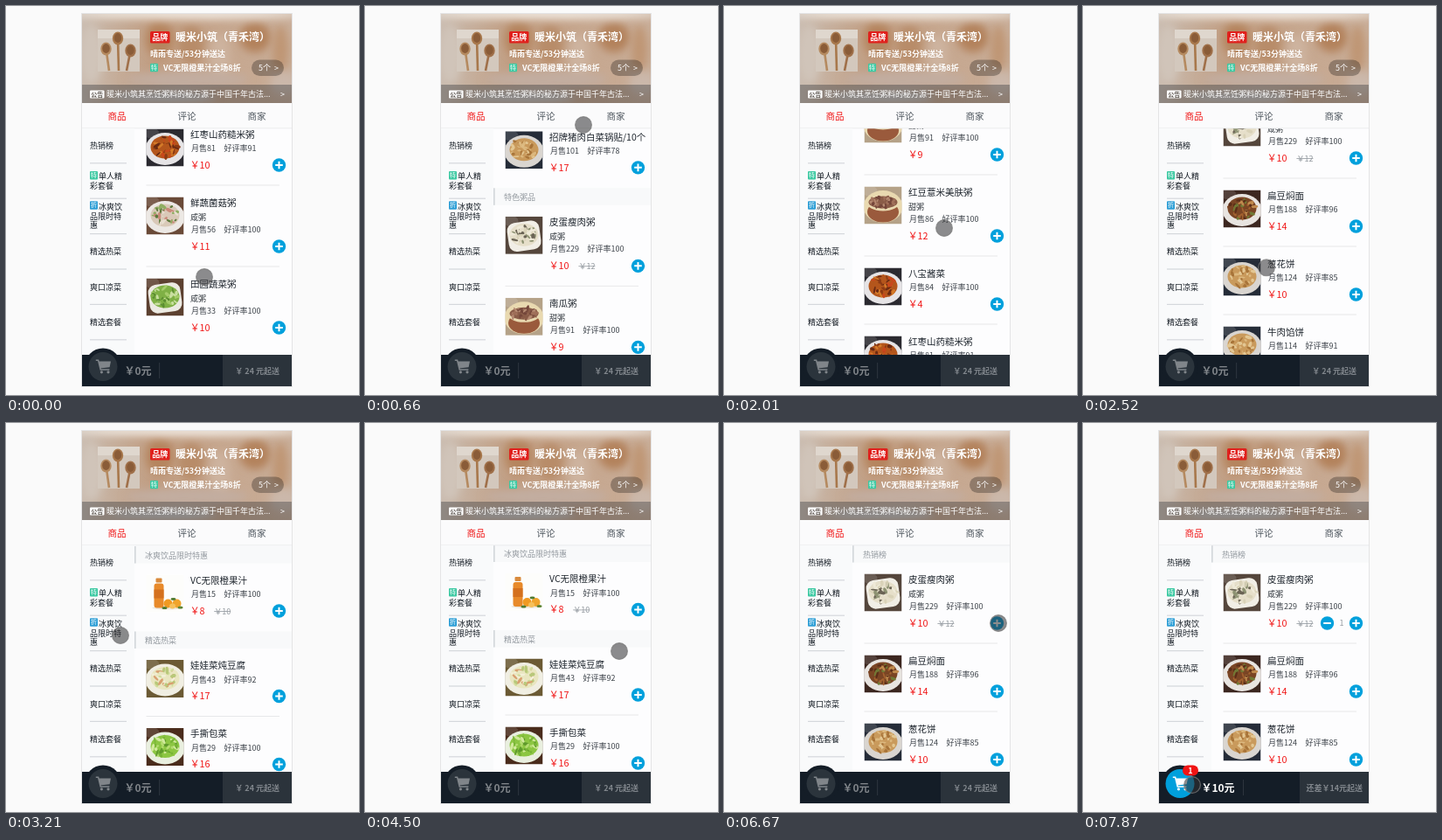
Recreate the animation shown at these times as an HTML page. Size 404 px wide and 445 px high, loop 7.99 s.

```html
<!DOCTYPE html>
<html lang="zh-CN">
<head>
<meta charset="utf-8">
<title>点餐</title>
<style>
html, body { margin: 0; width: 100%; height: 100%; overflow: hidden; background: #fafafa; }
svg { display: block; width: 404px; height: 445px; font-family: "Noto Sans CJK SC", "Noto Sans CJK", sans-serif; }
text { white-space: pre; }
</style>
</head>
<body>
<svg id="stage" viewBox="0 0 404 445"></svg>
<script>
const LOOP = 7990, STEPS = 60, TICK = LOOP / STEPS;
const BLUE = '#00a0dc', RED = '#f01414', BAR = '#141d27';

const rect = (x, y, w, h, fill, more = '') =>
  `<rect x="${x}" y="${y}" width="${w}" height="${h}" fill="${fill}" ${more}/>`;
const oval = (x, y, rx, ry, fill, more = '') =>
  `<ellipse cx="${x}" cy="${y}" rx="${rx}" ry="${ry}" fill="${fill}" ${more}/>`;
const path = (d, stroke, width, more = '') =>
  `<path d="${d}" fill="none" stroke="${stroke}" stroke-width="${width}" ${more}/>`;
// Text placed by the vertical centre of its line.
const label = (x, mid, size, fill, str, more = '') =>
  `<text x="${x}" y="${mid + size * 0.37}" font-size="${size}" fill="${fill}" ${more}>${str}</text>`;
const CENTER = 'text-anchor="middle" ', MEDIUM = 'font-weight="500"', BOLD = 'font-weight="700"';

function random(seed) {
  return () => (seed = (seed * 16807) % 2147483647) / 2147483647;
}

// Dish pictures: backdrop, plate, shape, food colours.
const DISHES = {
  egg: ['#55463c', '#f1eee6', 'square', '#e6dfca #d9d2b8 #efead9 #8d9272 #6b6455'],
  noodle: ['#3c2720', '#e8e4e0', 'round', '#7a4524 #a4622f #5b2e18 #c08a4d #6f7a35'],
  cake: ['#252c38', '#d9d5d0', 'round', '#c99a5c #dcb87e #a87439 #e3c793'],
  bean: ['#b5a288', '#e9d9b0', 'bowl', '#8a5c48 #a0705a #74463a #b58a72'],
  pickle: ['#2b2a30', '#e6e4e6', 'round', '#b4561c #8c3a14 #d47a28 #6a2a12 #c9471c'],
  mixed: ['#6a4a38', '#ece8e4', 'round', '#d9c9b8 #8fae62 #c98a7a #e8dfd0 #5e7a3c'],
  green: ['#5c4030', '#eceae2', 'square', '#7fb045 #a5cc6a #5b8d30 #c9dfa0'],
  tofu: ['#6b5a34', '#f0eee2', 'round', '#e9e6c0 #cfdc9a #f3f0d8 #b8c87a #d8a070'],
  cabbage: ['#4a2c1c', '#e9efdf', 'round', '#8cc642 #b4dc70 #5f9a2c #d2ea9c #78b436'],
};

function picture(kind, y, seed) {
  const at = (s) => `<svg x="160.5" y="${y}" width="43" height="43">${s}</svg>`;
  if (kind === 'juice') return at(
    rect(0, 0, 43, 43, '#fdfdfb') + oval(24, 38, 17, 2, '#ece8e0') +
    rect(11, 4, 7, 5, '#d98a3c', 'rx="1"') + rect(9, 10, 11, 28, '#e88a2a', 'rx="3"') +
    rect(9, 17, 11, 10, '#d4701e') + oval(25, 33, 5, 5, '#f09a22') +
    oval(35, 33, 5, 5, '#f0a42c') + oval(30, 36, 3.5, 3, '#f6c05a') +
    oval(21, 38, 3, 1.6, '#4f7a30') + oval(39, 37.5, 3, 1.6, '#5d8434') + oval(31, 28, 3, 1.4, '#4f7a30'));
  if (kind === 'cup') return at(
    rect(0, 0, 43, 43, '#d9d3ca') + rect(0, 31, 43, 12, '#c6bdb2') +
    `<path d="M13 12H31L28 40H17Z" fill="#e58d52"/><path d="M15 17H24L22 38H18Z" fill="#f0ae7a"/>` +
    oval(22, 12, 9, 4, '#f2c6a0') + oval(19, 9, 4, 4, '#d8412f') + oval(26, 10, 3.5, 3.5, '#e9694a') +
    path('M25 9L31 1', '#b84a38', 1));
  if (kind === 'set') return at(
    rect(0, 0, 43, 43, '#c9c9cb') + oval(15, 14, 14, 11, '#b58a4c') + oval(15, 13, 12, 9, '#ead9a8') +
    [8, 15, 22].map((x) => oval(x, 13, 3.6, 4.2, '#d9a93c')).join('') +
    oval(32, 23, 10, 7, '#eeeeee') + oval(32, 23, 7, 4.5, '#8c3038') +
    oval(20, 34, 13, 7, '#f4f4f2') + oval(20, 33, 9, 4.5, '#3f6a35') + oval(17, 32, 4, 2, '#6c9a4c'));

  const [bg, plate, shape, colors] = DISHES[kind];
  const list = colors.split(' '), rnd = random(seed * 977 + 31);
  let s = rect(0, 0, 43, 43, bg) + oval(6, 5, 9, 6, '#fff', 'opacity=".12"');
  if (shape === 'square') s += rect(3, 6, 37, 33, plate, 'rx="9" transform="rotate(-8 21 22)"');
  else s += oval(21.5, 23, 22.5, 18.5, plate);
  if (shape === 'bowl') s += oval(21.5, 29, 18, 12, '#9a5a3c') + oval(21.5, 18, 19, 10, plate);
  const cy = shape === 'bowl' ? 18 : 21, rx = 16.5, ry = shape === 'bowl' ? 7 : 13;
  s += oval(21.5, cy, rx, ry, list[0]);
  for (let i = 0; i < 40; i++) {
    const a = rnd() * 6.283, d = Math.sqrt(rnd());
    const x = (21.5 + Math.cos(a) * d * (rx - 1.5)).toFixed(1), v = (cy + Math.sin(a) * d * (ry - 1.5)).toFixed(1);
    s += oval(x, v, 1.5 + rnd() * 3, 0.8 + rnd() * 1.2,
      list[i % list.length], `transform="rotate(${(rnd() * 180) | 0} ${x} ${v})"`);
  }
  return at(s);
}

// Each line: name|description|sold|rating|price|old price|picture.  "#" opens a section.
const EGG = '皮蛋瘦肉粥|咸粥|229|100|10|12|egg';
const SNACKS = `扁豆焖面||188|96|14||noodle
葱花饼||124|85|10||cake
牛肉馅饼||114|91|14||cake
招牌猪肉白菜锅贴/10个||101|78|17||cake`;
const SWEET = `南瓜粥|甜粥|91|100|9||bean
红豆薏米美肤粥|甜粥|86|100|12||bean`;
const PICKLE = '八宝酱菜||84|100|4||pickle';
const SAVORY = `红枣山药糙米粥||81|91|10||pickle
鲜蔬菌菇粥|咸粥|56|100|11||mixed
田园蔬菜粥|咸粥|33|100|10||green`;
const ORANGE = 'VC无限橙果汁||15|100|8|10|juice';
const MENU = `#热销榜
${EGG}
${SNACKS}
${SWEET}
${PICKLE}
${SAVORY}
#单人精彩套餐
红枣山药粥套餐|红枣山药糙米粥,素材包,/爽口莴笋丝|17|100|29|36|set
#冰爽饮品限时特惠
${ORANGE}
#精选热菜
娃娃菜炖豆腐||43|92|17||tofu
手撕包菜||29|100|16||cabbage
香酥黄金鱼||15|100|11||noodle
#爽口凉菜
${PICKLE}
拍黄瓜||28|100|9||green
#精选套餐
红豆薏米粥套餐|红豆薏米粥,三鲜干蒸烧/卖,拍黄瓜|3|100|37||set
皮蛋瘦肉粥套餐||12|100|31||set
#果拼果汁
蜜瓜圣女萝莉杯||1||6||cup
酸梅汤||7|100|6||cup
${ORANGE}
#小吃主食
${SNACKS}
#特色粥品
${EGG}
${SWEET}
${SAVORY}`;

const plus = (y) => oval(312.5, y, 7.7, 7.7, BLUE) +
  path(`M308.2 ${y}H316.8M312.5 ${y - 4.3}V${y + 4.3}`, '#fff', 2);

function goods() {
  const GAP = 13.5, HEAD = 19.5;
  let y = 0, first = true, out = '';
  MENU.split('\n').forEach((line, i) => {
    if (line[0] === '#') {
      out += rect(147, y, 180, HEAD, '#f8f9fa') + rect(147, y, 1.6, HEAD, '#d2d6da') +
        label(159, y + 10.6, 9, '#93999f', line.slice(1));
      y += HEAD;
      first = true;
      return;
    }
    const [name, desc, sold, rate, price, old, kind] = line.split('|');
    const rows = desc ? desc.split('/') : [];
    const extra = rows.length ? 6 + 9 * rows.length : 0;
    if (!first) out += rect(160.5, y - 1, 152.5, 1, '#e7e8ea');
    first = false;
    const top = y + GAP - 0.5, cost = top + 41.5 + extra;
    out += picture(kind, top, i + 1) + label(211, top + 6.4, 10.5, '#1d242c', name);
    rows.forEach((r, n) => { out += label(211, top + 22.7 + 9 * n, 9, '#2f353b', r); });
    out += label(212, top + 22.2 + extra, 9, '#3d434a', '月售' + sold) +
      label(239.5 + 5 * sold.length, top + 22.2 + extra, 9, '#3d434a', '好评率' + rate) +
      label(210.7, cost, 10.8, RED, '￥' + price);
    if (old) {
      const x = 232 + 6.2 * price.length;
      out += label(x, cost + 0.5, 9, '#93999f', '￥' + old) + rect(x, cost, 19, 0.8, '#93999f');
    }
    out += plus(cost);
    y += GAP + 51 + extra + GAP;
  });
  return out;
}

const tag = (x, y, color, ch) => rect(x, y, 9, 9.5, color, 'rx="1"') +
  label(x + 4.5, y + 4.7, 7, '#fff', ch, CENTER);

function sidebar() {
  let s = rect(87, 140, 60, 259, '#f9fafb');
  for (let i = 0; i < 6; i++) s += rect(96, 179.2 + 40.4 * i, 42, 1.2, '#d5d8dc');
  const rows = [[96, 159.8, '热销榜'], [106, 195, '单人精'], [96, 205.5, '彩套餐'], [106, 229.7, '冰爽饮'],
    [96, 240.5, '品限时特'], [96, 251, '惠'], [96, 281, '精选热菜'], [96, 321.5, '爽口凉菜'], [96, 361.8, '精选套餐']];
  return s + rows.map(([x, y, str]) => label(x, y, 9, '#151c24', str, MEDIUM)).join('') +
    tag(96, 189, '#3cc9a2', '特') + tag(96, 223.2, '#2f9fd6', '折');
}

function spoons() {
  const spoon = (x, y, end, c) => path(`M${x} ${y}L${end} 74`, c, 2.6) +
    oval(x, y, 6.2, 7.4, c) + oval(x, y - 0.5, 4.3, 5.4, '#8a5c38');
  return rect(105, 27, 48, 48, '#d3c8bd') + rect(105, 27, 48, 10, '#dfd7ce') +
    spoon(128, 37, 129, '#a8784c') + spoon(114.5, 49, 118, '#b58a60') + spoon(142.5, 51, 138, '#a0704a');
}

function header() {
  const blob = (x, y, rx, ry, c) => oval(x, y, rx, ry, c, 'filter="url(#soft)"');
  return `<g clip-path="url(#head)">` + rect(87, 9, 240, 102, 'url(#wood)') +
    blob(98, 55, 13, 34, '#d0c4b9') + blob(176, 38, 16, 20, '#b5855e') + blob(212, 44, 15, 22, '#b88c69') +
    blob(245, 58, 12, 26, '#cdb39f') + blob(285, 36, 18, 17, '#b3825c') + blob(314, 50, 9, 28, '#bf9675') +
    blob(207, 84, 70, 10, '#c2ada0') + blob(318, 88, 16, 14, '#cbb8aa') +
    blob(207, 9, 135, 6, '#f0e9e1') + blob(180, 104, 60, 8, '#c6bfba') +
    rect(87, 90, 240, 21, '#07111b', 'opacity=".3"') + '</g>' + spoons() +
    rect(165, 29, 22.5, 13.5, '#e0201c', 'rx="1.5"') + label(176.3, 35.6, 9, '#fff', '品牌', CENTER + BOLD) +
    label(194, 35.6, 12, '#fff', '暖米小筑（青禾湾）', BOLD) +
    label(165, 54.7, 9, '#fff', '晴雨专送/53分钟送达', BOLD) +
    tag(165, 65.7, '#3cc9a2', '特') + label(180, 70.7, 9, '#fff', 'VC无限橙果汁全场8折', BOLD) +
    rect(281, 61.5, 37, 18.5, '#000', 'rx="9.2" opacity=".28"') + label(289, 71, 9, '#fff', '5个', MEDIUM) +
    label(307, 71, 9, '#fff', '&gt;', MEDIUM) +
    rect(96, 96.5, 16.5, 9, '#fff', 'rx="1"') + label(104.2, 101, 7, '#5d5650', '公告', CENTER + BOLD) +
    label(115, 101, 9, '#fff', '暖米小筑其烹饪粥料的秘方源于中国千年古法...', MEDIUM) +
    label(314, 101, 9, '#fff', '&gt;', MEDIUM);
}

const tabs = () => rect(87, 111, 240, 29, '#fbfbfc') + rect(87, 139.5, 240, 0.8, '#e6e8ea') +
  ['商品', '评论', '商家'].map((s, i) =>
    label(127 + 80 * i, 125.8, 10.5, i ? '#4d555d' : RED, s, CENTER)).join('');

function cartBar(full) {
  const ink = full ? '#fff' : '#80858a';
  let s = rect(87, 399, 240, 36, BAR) + rect(248, 399, 79, 36, '#2b333b') +
    oval(111, 412.5, 21, 21, BAR) + oval(111, 412.5, 16.5, 16.5, full ? BLUE : '#2b343c') +
    `<path d="M106 406.5H120L118.6 413.2L107.8 414.6Z" fill="${ink}"/>` +
    path('M102.8 405.2H105.6L108.2 416H118.4', ink, 1.5) + oval(109.4, 418.8, 1.6, 1.6, ink) + oval(117, 418.8, 1.6, 1.6, ink) +
    label(135.4, 417.3, 12, ink, full ? '￥10元' : '￥0元', BOLD) +
    rect(full ? 183 : 175.3, 408, 0.8, 18, '#343c45') +
    label(287.7, 418, 9, '#80868c', full ? '还差￥14元起送' : '￥ 24 元起送', CENTER + BOLD);
  if (full) s += rect(114, 391.5, 18, 12, RED, 'rx="6"') + label(123, 397.5, 9, '#fff', '1', CENTER + BOLD);
  return s;
}

const stage = document.getElementById('stage');
stage.innerHTML = `<defs>
<clipPath id="head"><rect x="87" y="9" width="240" height="102"/></clipPath>
<clipPath id="view"><rect x="147" y="140" width="180" height="259"/></clipPath>
<filter id="soft" x="-60%" y="-200%" width="220%" height="500%"><feGaussianBlur stdDeviation="5"/></filter>
<linearGradient id="wood"><stop offset="0" stop-color="#cabcb0"/><stop offset=".35" stop-color="#c09c80"/>
<stop offset=".7" stop-color="#c6a78f"/><stop offset="1" stop-color="#c8ad98"/></linearGradient></defs>` +
  rect(0, 0, 404, 445, '#fafafa') + rect(86.5, 8.5, 241, 427, '#fdfdfe', 'stroke="#e4e4e5"') +
  `<g clip-path="url(#view)"><g id="list">${goods()}<g id="minus"><g id="roll">` +
  oval(0, 0, 7.7, 7.7, BLUE) + path('M-4.3 0H4.3', '#fff', 2) + '</g>' +
  label(16.5, 0, 9, '#93999f', '1', CENTER) + '</g></g></g>' +
  header() + tabs() + sidebar() +
  `<g id="empty">${cartBar(false)}</g><g id="full">${cartBar(true)}</g>` +
  `<circle id="ball" r="6" fill="${BLUE}"/>` +
  '<circle id="touch" r="9.4" fill="#323234" fill-opacity=".56" stroke="#7c7c7c" stroke-opacity=".75" stroke-width="1.2"/>';

const el = (id) => document.getElementById(id);
const list = el('list'), minus = el('minus'), roll = el('roll'), ball = el('ball'), touch = el('touch');
const show = (node, on) => node.setAttribute('visibility', on ? 'visible' : 'hidden');
const move = (node, x, y) => node.setAttribute('transform', `translate(${x} ${y})`);

// Keys are [tick, ...values].
const SCROLL = [[0, 2696], [1, 2691], [2, 2688], [3, 2650], [6, 2150], [9, 1632.5], [12, 1000], [15, 464],
  [18, 110], [20, 0], [22, 0], [23, 800], [24, 1073], [25, 1074.5], [34, 1074.5], [37, 880], [41, 230],
  [43, 40], [44, 10.5], [45, 2], [46, 0]];
const TOUCH = [[0, 227, 310], [3, 240, 190], [5, 250, 136], [9, 279, 387], [12, 262, 180], [15, 252, 254],
  [18, 235, 320], [21, 160, 258], [23, 131, 243], [25, 131, 243], [28, 215, 185], [30, 275, 140],
  [32, 323, 215], [34, 291, 261], [37, 260, 165], [41, 240, 320], [44, 228, 207], [47, 290, 225],
  [49, 321, 230], [50, 314, 229], [53, 313, 230], [55, 258, 290], [57, 193, 376], [58, 158, 398], [59, 125, 414]];

function along(keys, k) {
  const i = keys.findIndex((key) => key[0] > k);
  if (i < 0) return keys[keys.length - 1].slice(1);
  const a = keys[i - 1], b = keys[i], p = (k - a[0]) / (b[0] - a[0]);
  return a.slice(1).map((v, n) => v + (b[n + 1] - v) * p);
}

const TAP = 51;

function draw(ms) {
  const k = Math.min(STEPS - 1, Math.floor((ms % LOOP + 40) / TICK));
  move(list, 0, 140 - along(SCROLL, k)[0]);
  move(touch, ...along(TOUCH, k));

  const added = k >= TAP, p = Math.min(1, Math.max(0, (k - TAP + 1) / 3));
  show(el('empty'), !added);
  show(el('full'), added);
  show(minus, added);
  move(minus, 279.5 + 18 * (1 - p), 89);
  minus.setAttribute('opacity', p);
  roll.setAttribute('transform', `rotate(${180 * (1 - p)})`);

  // The ball rises a little before it falls into the cart.
  const fly = (k - TAP + 0.5) / 3;
  show(ball, fly > 0 && fly < 1);
  move(ball, 312 - 201 * fly, 229 + 184 * (1.55 * fly * fly - 0.55 * fly));
}

const start = performance.now();
function frame() {
  draw(performance.now() - start);
  requestAnimationFrame(frame);
}
frame();
</script>
</body>
</html>
```
